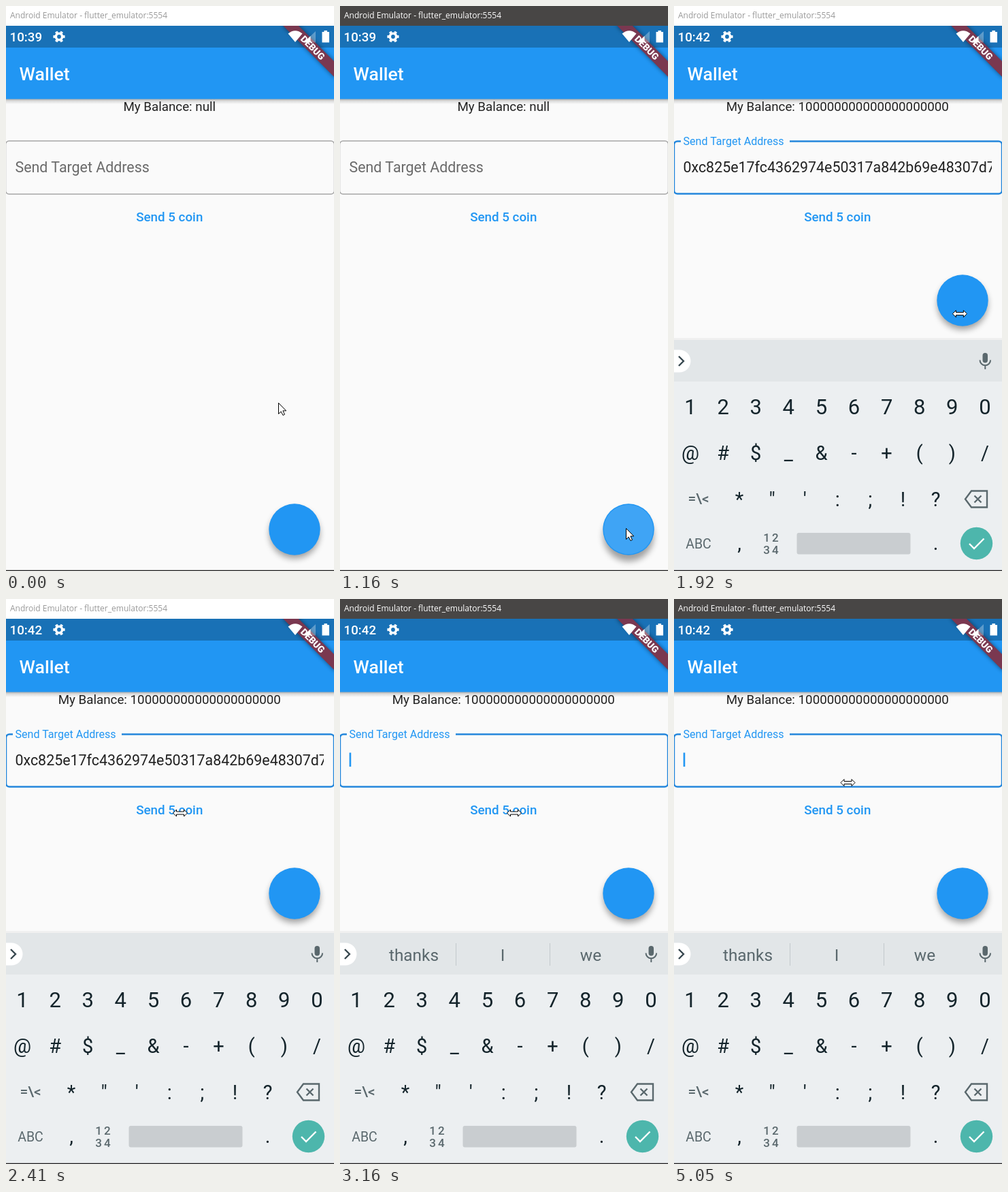
These frames come from a looping animation (482 px wide and 829 px high, 5.18 s). An HTML page:

```html
<!DOCTYPE html>
<html lang="en">
<head>
<meta charset="utf-8">
<title>Wallet</title>
<style>
  html, body { margin: 0; width: 100%; height: 100%; overflow: hidden; background: #fafafa; }
  svg { display: block; width: 100%; height: 100%; font-family: Roboto, sans-serif; }
  text { white-space: pre; }
  .medium { font-weight: 500; }
  .mid { text-anchor: middle; }
  .body { font-size: 18.75px; }
  .ink { fill: rgba(0, 0, 0, .87); }
  .blue { fill: #2196f3; }
  .white { fill: #fff; }
  .key { fill: #14242b; }
  .dim { fill: #5a686d; }
  .line { fill: none; stroke: #5a686d; stroke-width: 2.4; }
  .pointer { fill: #fff; stroke: #000; }
</style>
</head>
<body>
<svg viewBox="0 0 482 829">
  <defs>
    <filter id="soft" x="-50%" y="-50%" width="200%" height="200%"><feGaussianBlur stdDeviation="5"/></filter>
    <filter id="haze" x="-50%" y="-100%" width="200%" height="300%"><feGaussianBlur stdDeviation="3"/></filter>
    <linearGradient id="shade" x2="0" y2="1">
      <stop stop-color="#000" stop-opacity=".34"/>
      <stop offset=".4" stop-color="#000" stop-opacity=".13"/>
      <stop offset="1" stop-color="#000" stop-opacity="0"/>
    </linearGradient>
    <clipPath id="app"><rect y="29" width="482" height="800"/></clipPath>
    <clipPath id="field"><rect x="13" y="215" width="454" height="45"/></clipPath>
    <clipPath id="button"><rect x="180" y="285" width="120" height="50" rx="5"/></clipPath>
    <clipPath id="disc"><circle r="37.7"/></clipPath>
  </defs>

  <rect width="482" height="829" fill="#fafafa"/>
  <rect id="bar" width="482" height="29"/>
  <text id="caption" x="6" y="18" font-family="Open Sans, sans-serif" font-size="12">Android Emulator - flutter_emulator:5554</text>

  <rect y="136" width="482" height="8" fill="url(#shade)"/>
  <rect y="61" width="482" height="75.5" class="blue"/>
  <rect y="29" width="482" height="32" fill="#1971b6"/>
  <text x="19.5" y="109" font-size="26.6" class="white medium">Wallet</text>

  <text id="balance" x="240.3" y="154" class="body ink mid"></text>

  <g id="idle">
    <rect x="-.5" y="198" width="483" height="78" rx="5" fill="none" stroke="#a6a6a6" stroke-width="1.5"/>
    <text x="13.5" y="244" font-size="21.4" fill="#6a6a6a">Send Target Address</text>
  </g>
  <g id="focused">
    <path d="M170 198.5H477a5 5 0 0 1 5 5V270.500a5 5 0 0 1-5 5H5a5 5 0 0 1-5-5V203.500a5 5 0 0 1 5-5H10" fill="none" stroke="#2487dc" stroke-width="2.5"/>
    <text x="13.5" y="204" font-size="16.07" class="blue">Send Target Address</text>
    <text id="address" x="13.5" y="243.500" font-size="21.4" class="ink" clip-path="url(#field)">0xc825e17fc4362974e50317a842b69e48307d7</text>
    <rect id="caret" x="13.7" y="225.500" width="2.6" height="20.500" class="blue"/>
  </g>

  <g clip-path="url(#button)"><circle id="splash" cx="254" cy="313" class="blue"/></g>
  <text x="240.3" y="316" class="body blue medium mid">Send 5 coin</text>

  <g id="fab">
    <circle id="fabShadow" r="37" filter="url(#soft)"/>
    <circle r="37.7" class="blue"/>
    <g clip-path="url(#disc)"><circle id="fabSplash" class="white"/></g>
  </g>

  <g id="keyboard">
    <rect y="487" width="482" height="3" fill="#000" opacity=".04"/>
    <rect y="490" width="482" height="339" fill="#eceff1"/>
    <rect y="490" width="482" height="61" fill="#e2e6e8"/>
    <path d="M0 504.500H8a16.500 16.500 0 0 1 0 33H0Z" class="white"/>
    <path d="M7 514L14 521L7 528" class="line" style="stroke:#37474f"/>
    <rect x="453.500" y="509" width="7.500" height="14.500" rx="3.700" class="dim"/>
    <path d="M449.500 519.500a7.800 7.800 0 0 0 15.600 0M457.300 527.500V533" class="line" style="stroke-width:2"/>
    <g id="suggestions" font-size="24.4" class="dim mid">
      <text x="108.500" y="530.500">thanks</text><text x="239" y="530.500">I</text><text x="368.500" y="530.500">we</text>
      <path d="M170.500 505V538M308.500 505V538" stroke="#c3c9cc"/>
    </g>
    <g id="keys" class="key mid"></g>
    <g class="dim mid medium">
      <text x="36" y="730" font-size="21">=\&lt;</text>
      <text x="36" y="796" font-size="19.500" font-weight="400">ABC</text>
      <text x="144" y="786" font-size="17" letter-spacing="3">12</text>
      <text x="144" y="804" font-size="17" letter-spacing="3">34</text>
    </g>
    <path d="M437 711.500H460V735.500H437L428 723.500ZM441.500 718.500L451.500 728.500M451.500 718.500L441.500 728.500" class="line"/>
    <rect x="180.500" y="773" width="167" height="31.500" rx="3" fill="#c9cdd0"/>
    <circle cx="444.500" cy="788.500" r="23.700" fill="#4db6ac"/>
    <path d="M434 789L441 796L455.500 781.500" class="line" style="stroke:#fff"/>
  </g>
  <rect y="827.700" width="482" height="1.300" fill="#222"/>

  <g clip-path="url(#app)">
    <g transform="translate(483 29) rotate(45)">
      <rect x="-54" y="37.500" width="108" height="16" opacity=".5" filter="url(#haze)"/>
      <rect x="-54" y="37.500" width="108" height="16" fill="#7a3850"/>
      <text y="50.300" font-size="13.600" font-weight="900" class="white mid">DEBUG</text>
    </g>
  </g>
  <g class="white">
    <text id="clock" x="5.500" y="52" class="body medium"></text>
    <g fill="none" stroke="#fff">
      <circle cx="78" cy="45" r="4.700" stroke-width="3.600"/>
      <circle cx="78" cy="45" r="7.200" stroke-width="2.800" pathLength="12" stroke-dasharray="1" stroke-dashoffset=".5"/>
    </g>
    <path d="M425 53L414.500 40.500Q425 32 435.500 40.500Z"/>
    <path d="M455 37V53.500H437.500Z" opacity=".3"/>
    <path d="M447.500 44V53.500H437.500Z"/>
    <path d="M464.500 38H467.500V36H472V38H475V53.500H464.500Z"/>
  </g>

  <path id="arrow" class="pointer" d="M.5 .5V16.500L4.200 13L7 18.500L9.500 17.300L6.900 11.900H11.700Z"/>
  <path id="resize" class="pointer" d="M-10.500 0L-5.500-5V-2H5.500V-5L10.500 0L5.500 5V2H-5.500V5Z"/>
</svg>

<script>
const LOOP = 5180;
const el = {};
document.querySelectorAll('svg [id]').forEach(node => el[node.id] = node);

// One row of centred key labels, 48.1 px apart.
const row = (labels, x, y, size) => [...labels].map((label, i) =>
  label === ' ' ? '' : `<text x="${x + i * 48.1}" y="${y}" font-size="${size}">${label.replace('&', '&amp;')}</text>`).join('');
el.keys.innerHTML = row('1234567890', 24, 598.5, 31) + row('@#$_&-+()/', 24, 666, 29)
  + row('*"\':;!?', 96, 734, 29) + row(',     .', 96, 798, 29);

const clamp = v => Math.max(0, Math.min(1, v));
const ease = p => p * p * (3 - 2 * p);
const show = (node, on) => node.setAttribute('visibility', on ? 'inherit' : 'hidden');
const put = (node, x, y) => node.setAttribute('transform', `translate(${x.toFixed(1)} ${y.toFixed(1)})`);
const ring = (node, r, alpha) => { node.setAttribute('r', r); node.setAttribute('opacity', alpha); };

// Share of a move done at t, when it advances in n jumps between first and last.
const jumps = (t, first, last, n) =>
  clamp((Math.floor((t - first) / ((last - first) / (n - 1)) + 1e-6) + 1) / n);

const curve = (p, a, b, c) => [0, 1].map(i =>
  (1 - p) ** 2 * a[i] + 2 * p * (1 - p) * b[i] + p * p * c[i]);

const moves = [
  { from: 1510, first: 1580, last: 1990, n: 7, path: [[400, 778], [402, 560], [430, 378]] },
  { from: 2060, first: 2060, last: 2410, n: 6, path: [[430, 378], [330, 276], [256, 314]] },
  { from: 3970, first: 3970, last: 4310, n: 5, path: [[256, 314], [264, 315], [271, 321]] },
  { from: 4580, first: 4580, last: 5050, n: 7, path: [[271, 321], [262, 300], [255.5, 269.5]] },
];

function render(t) {
  const typed = t >= 1370;
  const active = t >= 620 && t < 1370 || t >= 2550;
  const cleared = t >= 2740;

  el.bar.setAttribute('fill', active ? '#484645' : '#fff');
  el.caption.setAttribute('fill', active ? '#fff' : '#999');
  el.clock.textContent = typed ? '10:42' : '10:39';
  el.balance.textContent = 'My Balance: ' + (typed ? '1' + '0'.repeat(20) : 'null');
  show(el.idle, !typed);
  show(el.focused, typed);
  show(el.keyboard, typed);
  show(el.address, typed && !cleared);
  show(el.suggestions, t >= 3020);
  show(el.caret, t >= 3020 && t < 3570 || t >= 4040 && t < 4580 || t >= 5050);

  // Floating button: press splash and raised shadow.
  put(el.fab, 424, typed ? 432 : 768);
  const press = !typed && t >= 880 ? jumps(t, 880, 1300, 7) : 0;
  const lift = Math.sin(Math.PI * Math.min(press, .999));
  ring(el.fabSplash, 12 + 34 * press, press ? .24 * clamp(2 - 2 * press) : 0);
  el.fabShadow.setAttribute('cy', 6 + 5 * lift);
  el.fabShadow.setAttribute('opacity', .36);

  // Text button splash: grows, then fades.
  const step = Math.floor((t - 2740) / 70 + 1e-6);
  const lit = step >= 0 && step < 6;
  ring(el.splash, lit ? 14 + 8 * step + 5 * step * (step - 1) : 0, lit ? .12 * clamp((6 - step) / 4) : 0);

  show(el.arrow, !typed);
  show(el.resize, t >= 1510);
  put(el.arrow, ...curve(ease(jumps(t, 70, 490, 7)), [400, 582], [474, 660], [420, 766]));
  const move = moves.filter(m => t >= m.from).pop();
  if (move) put(el.resize, ...curve(ease(jumps(t, move.first, move.last, move.n)), ...move.path));
}

const start = performance.now();
function tick() {
  render((performance.now() - start) % LOOP);
  requestAnimationFrame(tick);
}
tick();
</script>
</body>
</html>
```
